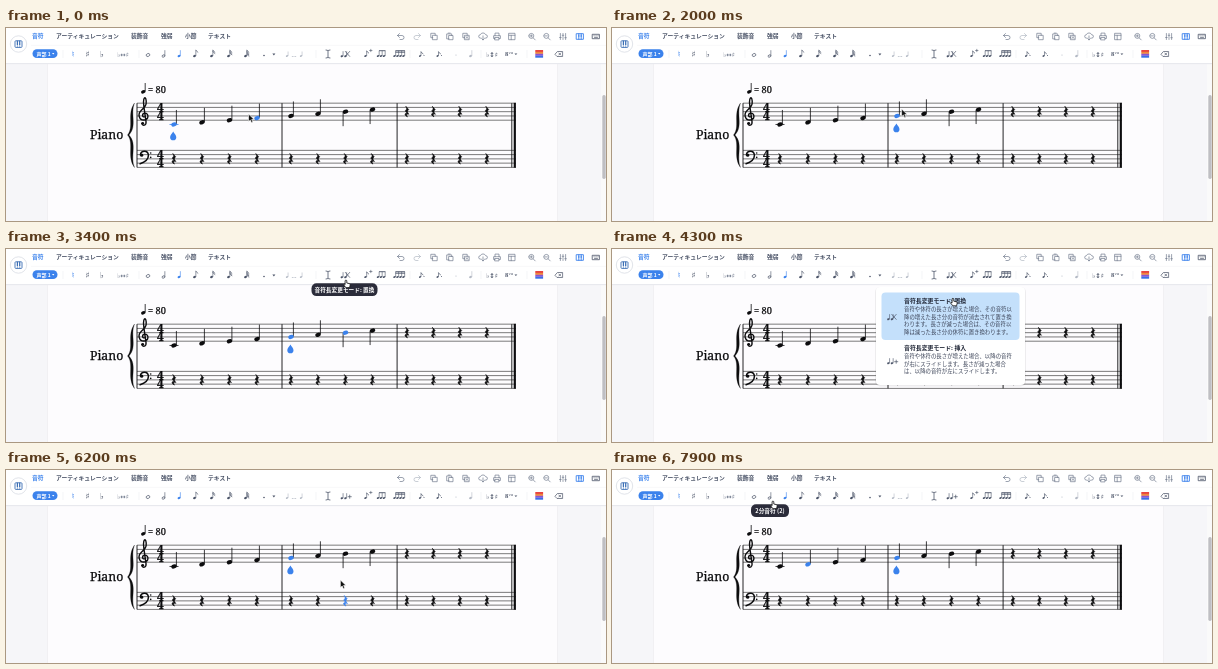
An HTML page that plays this animation: 600x193 px, repeating every 8 s.

```html
<!DOCTYPE html>
<html lang="ja">
<head>
<meta charset="utf-8">
<title>Score editor</title>
<style>
  html, body { margin: 0; width: 100%; height: 100%; overflow: hidden; background: #fff; }
  svg { display: block; width: 100vw; height: 100vh; }
  text { font-family: "Noto Sans CJK JP", "Noto Sans CJK", sans-serif; white-space: pre; }
  .music { font-family: "DejaVu Sans", sans-serif; font-weight: bold; }
  .serif { font-family: "Noto Serif", serif; }
  .engraved { stroke: #0c0c0e; stroke-width: 0.25; }
</style>
</head>
<body>
<svg id="stage" viewBox="0 0 600 193"></svg>
<script>
const BLUE = '#3b82ec', INK = '#0c0c0e', ICON = '#4b5468', SOFT = '#727b8e', PALE = '#b4bac5';
const LOOP = 8000, STEP = 2.13, GAP = STEP * 2;
const TREBLE = 92.2, BASS = 139.4;            // bottom staff lines
const stage = document.getElementById('stage');

function add(tag, attrs = {}, parent = stage) {
  const el = document.createElementNS('http://www.w3.org/2000/svg', tag);
  for (const key in attrs) el.setAttribute(key, attrs[key]);
  parent.append(el);
  return el;
}
const group = (parent = stage, attrs = {}) => add('g', attrs, parent);
const rect = (x, y, width, height, fill, rx = 0, parent = stage) =>
  add('rect', { x, y, width, height, fill, rx }, parent);
const dot = (cx, cy, r, fill = INK, parent = stage) => add('circle', { cx, cy, r, fill }, parent);
const line = (x1, y1, x2, y2, stroke = INK, width = 0.7, parent = stage) =>
  add('line', { x1, y1, x2, y2, stroke, 'stroke-width': width }, parent);
const fillPath = (d, fill, parent = stage) => add('path', { d, fill }, parent);
const strokePath = (d, stroke, width = 0.8, parent = stage) => add('path', {
  d, stroke, fill: 'none', 'stroke-width': width, 'stroke-linecap': 'round', 'stroke-linejoin': 'round'
}, parent);
function label(x, y, size, string, fill, attrs = {}, parent = stage) {
  const el = add('text', { x, y, 'font-size': size, fill, ...attrs }, parent);
  el.textContent = string;
  return el;
}
const at = (x, y, parent = stage) => group(parent, { transform: `translate(${x} ${y})` });
const show = (el, visible) => el.setAttribute('visibility', visible ? 'visible' : 'hidden');

// ---- Page ----
rect(0, 0, 600, 193, '#f6f6f9');
rect(41.5, 35, 510, 158, '#fdfcfe');
line(41.5, 35, 41.5, 193, '#ececf0', 0.7);
line(551.5, 35, 551.5, 193, '#ececf0', 0.7);
rect(595, 35, 5, 158, '#fafafa');
rect(596.3, 67, 3.4, 84, '#bfbfc3', 1.7);

// ---- Score ----
for (const bottom of [TREBLE, BASS])
  for (let i = 0; i < 5; i++) line(131, bottom - i * GAP, 510, bottom - i * GAP, '#222', 0.6);
const scoreTop = TREBLE - 4 * GAP;
for (const x of [131, 276, 391.1, 505.8]) line(x, scoreTop, x, BASS, INK, 0.9);
line(508.8, scoreTop - 0.3, 508.8, BASS + 0.3, INK, 2.2);
add('path', {
  d: 'M128.5 75C120.5 86 128.5 99 121.5 107C128.5 115 120.5 129 128.5 139.5C124 128 131.5 116 123 107C131.5 98 124 86 128.5 75Z',
  fill: INK, class: 'engraved'
});
label(117.3, 111.3, 12.3, 'Piano', INK, { class: 'serif engraved', 'text-anchor': 'end' });

strokePath('M138.3 88.9c-2.2 .3-2.6-3.6 .5-3.8c4.2 0 4.4 6.6-.8 6.9c-5.6 .1-6.4-6.5-2.6-9.8c3.6-3.2 5.2-5 4.8-9.2c-.3-3.4-1.6-4.4-2.4-1.6c-.8 2.6-.3 4.8 .2 7.9l2 14c.6 4.6-3.8 5-4 2.2', INK, 1.4);
dot(136.7, 95.3, 1.4);
strokePath('M134.4 127c0-5 8-5.4 8 .6c0 4.2-4.2 6.8-8.3 8.2', INK, 1.5);
dot(135.7, 127.2, 1.6);
dot(144.7, 125, 0.8);
dot(144.7, 129.4, 0.8);
for (const bottom of [TREBLE, BASS])
  for (const y of [bottom - 2 * GAP, bottom])
    label(154.3, y, 12, '4', INK, { class: 'serif engraved', 'font-weight': 'bold', 'text-anchor': 'middle' });

function noteHead(x, y, parent, size = 2.8, hollow = false) {
  return add('ellipse', {
    cx: x, cy: y, rx: size, ry: size * 0.72, transform: `rotate(-22 ${x} ${y})`,
    fill: hollow ? 'none' : 'currentColor', stroke: 'currentColor', 'stroke-width': hollow ? 0.7 : 0
  }, parent);
}
const tempo = group(stage, { color: INK });
noteHead(137.3, 63.8, tempo, 2.3);
line(139.2, 63.4, 139.2, 55, INK, 0.8, tempo);
label(142, 64.8, 9.2, '= 80', INK, { class: 'serif engraved' });

const columns = [168, 196, 223.5, 251, 285, 312, 339.5, 366.5, 401, 427.5, 454, 481];
const REST = 'M-1.2-5.4L1.7-2.1C-.2-.4 .3 .8 2 2.6C-.6 1.8-.9 3.4 .5 5.2C-3 3.4-2.4 1.2 .2 1.6L-1.8-.8C.2-2.6-.2-3.6-1.2-5.4Z';
const rest = (x, bottom) => {
  const g = at(x, bottom - 2 * GAP);
  add('path', { d: REST, fill: 'currentColor', stroke: 'currentColor', 'stroke-width': 0.6 }, g);
  return g;
};
// Only the head and ledger line take the highlight; the stem stays black.
function scaleNote(x, degree) {
  const g = group(), y = TREBLE + (2 - degree) * STEP, side = degree < 6 ? 1 : -1;
  line(x + side * 2.4, y - side * 0.5, x + side * 2.4, y - side * 14.5, INK, 0.8, g);
  noteHead(x, y, g);
  if (degree === 0) line(x - 4.5, y, x + 4.5, y, 'currentColor', 0.8, g);
  return g;
}
const trebleItems = columns.map((x, i) => i < 8 ? scaleNote(x, i) : rest(x, TREBLE));
const bassItems = columns.map(x => rest(x, BASS));

const drop = group();
fillPath('M0-4.5C1-2.6 3.1-.8 3.1 1.2A3.1 3.1 0 0 1-3.1 1.2C-3.1-.8-1-2.6 0-4.5Z', BLUE, drop);

// ---- Toolbar ----
rect(0, 35, 600, 1.2, '#e8e9ee');
rect(0, 0, 600, 35, '#fff');
line(25, 17.3, 600, 17.3, '#f1f2f5', 0.6);

add('circle', { cx: 12.5, cy: 16, r: 8.2, fill: '#fff', stroke: '#d8dce4', 'stroke-width': 0.8 });
add('rect', { x: 9, y: 12.8, width: 7, height: 6.6, rx: 0.8, fill: 'none', stroke: '#3b6fb5', 'stroke-width': 0.9 });
strokePath('M11.4 13v3.4M13.7 13v3.4', '#3b6fb5', 1.2);
strokePath('M11.4 16v3.2M13.7 16v3.2', '#3b6fb5', 0.5);

[['音符', 26, BLUE], ['アーティキュレーション', 50], ['装飾音', 125], ['強弱', 155], ['小節', 179], ['テキスト', 202]]
  .forEach(([name, x, color = ICON]) => label(x, 10.4, 5.8, name, color, { 'font-weight': 'bold' }));

const topIcons = [
  [395, 'M-1.5-3l-2 2l2 2M-3.5-1h4.5a2 2 0 0 1 0 4h-2'],
  [411, 'M1.5-3l2 2l-2 2M3.5-1h-4.5a2 2 0 0 0 0 4h2', PALE],
  [428, 'M-1.2-1.2h4.4v4.4h-4.4zM-1.2 1.2h-2v-4.4h4.4v2'],
  [444, 'M-1-1h4v4.2h-4zM-1 2.4h-2.3v-5h5v1.6M-1.8-3.4h2'],
  [460, 'M-1.2-1.2h4.4v4.4h-4.4zM-1.2 1.2h-2v-4.4h4.4v2M0 0l2 2M2 0l-2 2'],
  [477, 'M-2 1.6h-.6a1.7 1.7 0 0 1 0-3.4a2.8 2.8 0 0 1 5.2 0a1.7 1.7 0 0 1 .2 3.4h-.8M0-.6v4M-1.3 2.2l1.3 1.3l1.3-1.3'],
  [491, 'M-2-.8v-2.6h4v2.6M-2 2h-1.4v-2.8h6.8v2.8h-1.4M-2 1h4v2.4h-4z'],
  [506, 'M-3-3.2h6v6.4h-6zM-3-1.2h6M-.8-1.2v4.4'],
  [526, 'M-3.2-.6a2.5 2.5 0 1 0 5 0a2.5 2.5 0 1 0-5 0M1.2 1.4l2 2M-1.8-.6h2.2M-.7-1.7v2.2'],
  [541, 'M-3.2-.6a2.5 2.5 0 1 0 5 0a2.5 2.5 0 1 0-5 0M1.2 1.4l2 2M-1.8-.6h2.2'],
  [557, 'M-2.6-3v6M0-3v6M2.6-3v6M-3.4 1h1.6M-.8-1.2h1.6M1.8 1.2h1.6']
];
topIcons.forEach(([x, d, color = SOFT]) => strokePath(d, color, 0.7, at(x, 8.5)));
strokePath('M-3.4-2.8h6.8v5.6h-6.8zM-1.2-2.8v5.6M1.2-2.8v5.6M-1.2-1.4v1.4M1.2-1.4v1.4', BLUE, 0.9, at(574, 8.5));
strokePath('M-3.4-2.2h6.8v4.4h-6.8zM-2-.8h.1M0-.8h.1M2-.8h.1M-1.5 .8h3', ICON, 0.8, at(590, 8.5));

rect(26.5, 21.3, 25, 8.8, BLUE, 4.4);
label(30.5, 27.6, 5, '声部 1', '#fff', { 'font-weight': 'bold' });
fillPath('M46 25l2.4 0l-1.2 1.5z', '#fff');

const symbol = (x, string, color = ICON, size = 8.5) =>
  label(x, 28.8, size, string, color, { class: 'music', 'text-anchor': 'middle' });
symbol(67, '♮', BLUE);
symbol(81.5, '♯');
symbol(96, '♭');
symbol(117, '♭↔♯', SOFT, 6.5);
for (const x of [57, 133, 310, 404, 475, 521]) line(x, 22, x, 30, '#eceef2', 0.6);

function miniNote(x, { color = ICON, flags = 0, hollow = false, y = 28, height = 5.8, size = 1.5, parent = stage } = {}) {
  const g = group(parent, { color });
  noteHead(x, y, g, size, hollow);
  line(x + size * 0.9, y, x + size * 0.9, y - height, color, 0.6, g);
  for (let i = 0; i < flags; i++)
    strokePath(`M${x + size * 0.9} ${y - height + i * 1.3}q.3 1 2 2`, color, 0.7, g);
}
noteHead(142, 27, group(stage, { color: ICON }), 1.9, true);
miniNote(157.5, { hollow: true });
miniNote(173, { color: BLUE });
[188.5, 205.5, 222.5, 239.5].forEach((x, i) => miniNote(x, { flags: i + 1 }));
dot(258, 27.5, 0.8, ICON);
fillPath('M266.4 25.6h3l-1.5 1.8z', ICON);
miniNote(281, { color: PALE, size: 1.2, height: 4.5 });
symbol(288, '…', PALE, 5);
miniNote(295, { color: PALE, size: 1.2, height: 4.5 });

strokePath('M-2-4q2 0 2 1q0-1 2-1M0-3v6M-2 4q2 0 2-1q0 1 2 1', ICON, 0.8, at(322, 26));

function modeIcon(x, y, mark) {
  const g = at(x, y);
  miniNote(-3.6, { y: 2.2, size: 1.3, height: 5, parent: g });
  miniNote(0, { y: 2.2, size: 1.3, height: 5, parent: g });
  strokePath(mark === 'x' ? 'M-.2-2.6l4.4 5M4.2-2.6l-4.4 5' : 'M2.6 .7h3.2M4.2-.9v3.2', ICON, 0.7, g);
  return g;
}
const replaceIcon = modeIcon(339.5, 26, 'x');
const insertIcon = modeIcon(339.5, 26, '+');

miniNote(359.5, { size: 1.3, height: 5, flags: 1 });
strokePath('M363.6 22.5h2.4M364.8 21.3v2.4', ICON, 0.6);
function beamed(x, count, beams) {
  for (let i = 0; i < count; i++) miniNote(x + i * 3, { size: 1.3, height: 5.3 });
  for (let i = 0; i < beams; i++)
    line(x + 1, 22.7 + i * 1.5, x + (count - 1) * 3 + 1.4, 22.7 + i * 1.5, ICON, 0.9);
}
beamed(372, 3, 1);
beamed(388.5, 4, 2);
miniNote(414, { size: 1.1, height: 4.2, flags: 1 });
dot(418, 27.5, 0.5, ICON);
miniNote(431.5, { size: 1.1, height: 4.2, flags: 1 });
dot(435.5, 27.5, 0.5, ICON);
dot(450, 27, 0.6, PALE);
miniNote(464.5, { color: PALE });
symbol(486, '♭↕♯', ICON, 6.5);
label(499, 27.5, 6, '8', ICON, { class: 'serif', 'font-weight': 'bold' });
label(502.6, 26, 4, 'va', ICON, { class: 'serif', 'font-style': 'italic' });
fillPath('M508.5 25.4h2.8l-1.4 1.7z', ICON);
['#e8453f', '#f0873c', '#8a55d0', '#3b6fe6'].forEach((color, i) => rect(529.3, 22 + i * 1.9, 7.8, 2, color));
strokePath('M-3.8 0l2.2-2.5h5.2v5h-5.2zM-.2-1l2 2M1.8-1l-2 2', ICON, 0.7, at(553, 26));

// ---- Tooltips and menu ----
function tooltip(x, width, string) {
  const g = group();
  rect(x, 34.3, width, 12.8, '#2b2c3a', 5, g);
  label(x + width / 2, 42.9, 5.7, string, '#fff', { 'font-weight': 'bold', 'text-anchor': 'middle' }, g);
  return g;
}
const REPLACE = '音符長変更モード: 置換';
const modeTip = tooltip(305.5, 66, REPLACE);
const halfTip = tooltip(139, 38, '2分音符 (2)');

const menu = group();
rect(263, 38, 151, 99.5, '#00000010', 5, menu);
rect(264, 38, 149, 98, '#fff', 4, menu);
rect(269.5, 43.5, 138, 47.5, '#c4e0fb', 4, menu);
function menuItem(top, title, lines) {
  label(292, top, 5.9, title, '#222838', { 'font-weight': 'bold' }, menu);
  lines.forEach((string, i) =>
    label(292, top + 8.1 + i * 7.5, 5.4, string, '#3c4458', { 'font-weight': 500 }, menu));
}
menuItem(53.9, REPLACE, [
  '音符や休符の長さが増えた場合、その音符以',
  '降の増えた長さ分の音符が消去されて置き換',
  'わります。長さが減った場合は、その音符以',
  '降は減った長さ分の休符に置き換わります。'
]);
menuItem(101.2, '音符長変更モード: 挿入', [
  '音符や休符の長さが増えた場合、以降の音符',
  'が右にスライドします。長さが減った場合',
  'は、以降の音符が左にスライドします。'
]);
menu.append(modeIcon(280, 68, 'x'), modeIcon(280, 112, '+'));

// ---- Pointer ----
const arrow = group(), hand = group();
add('path', { d: 'M0 0v7.6l1.8-1.6l1.2 2.7l1.4-.6l-1.2-2.6h2.4z', fill: '#111', stroke: '#fff', 'stroke-width': 0.6 }, arrow);
add('path', {
  d: 'M-.9 .6q.9-1.2 1.7 0v2.4l2.6 .6q1 .3 .8 1.4l-.6 2.6h-3.8l-2.3-3q.4-1 1.6 0z',
  fill: '#fff', stroke: '#111', 'stroke-width': 0.8
}, hand);

const pointerPath = [
  [0, 242.5, 86], [100, 242.5, 86], [900, 288.5, 82], [1000, 289.5, 81], [2000, 289.5, 81],
  [2500, 332, 58], [2900, 340, 31], [3900, 340, 31], [4300, 341, 49], [4600, 336, 109],
  [4700, 335.5, 110], [6000, 335.5, 110], [6200, 334.5, 110], [6800, 262, 98],
  [7300, 196, 62], [7500, 185, 34], [7700, 161, 31], [LOOP, 161, 31]
];
function pointerAt(t) {
  const i = pointerPath.findIndex(point => point[0] > t);
  const [t0, x0, y0] = pointerPath[i - 1], [t1, x1, y1] = pointerPath[i];
  const k = (t - t0) / (t1 - t0);
  return [x0 + (x1 - x0) * k, y0 + (y1 - y0) * k];
}

// The hovered item stays lit while the pointer is over the toolbar or the menu.
function hoveredItem(t) {
  let [x, y] = pointerAt(t);
  while (y < 42 || (t > 2900 && t < 6000)) [x, y] = pointerAt(t -= 50);
  const distance = i => Math.abs(columns[i] - x);
  const nearest = columns.reduce((best, _, i) => distance(i) < distance(best) ? i : best, 0);
  return (y < 107 ? trebleItems : bassItems)[nearest];
}

function draw(t) {
  const selected = t < 1000 ? 0 : 4, hovered = hoveredItem(t);
  for (const item of [...trebleItems, ...bassItems])
    item.setAttribute('color', item === hovered || item === trebleItems[selected] ? BLUE : INK);
  drop.setAttribute('transform', selected ? 'translate(284.4 100)' : 'translate(167.2 108)');

  const menuOpen = t >= 3600 && t < 5000;
  show(menu, menuOpen);
  show(modeTip, t >= 2900 && t < 3600);
  show(halfTip, t >= 7700);
  show(replaceIcon, t < 5000);
  show(insertIcon, t >= 5000);

  const [x, y] = pointerAt(t), overControl = menuOpen || y < 36;
  for (const pointer of [arrow, hand]) pointer.setAttribute('transform', `translate(${x} ${y})`);
  show(hand, overControl);
  show(arrow, !overControl);
}

const start = performance.now();
function tick() {
  draw((performance.now() - start) % LOOP);
  requestAnimationFrame(tick);
}
tick();
</script>
</body>
</html>
```
